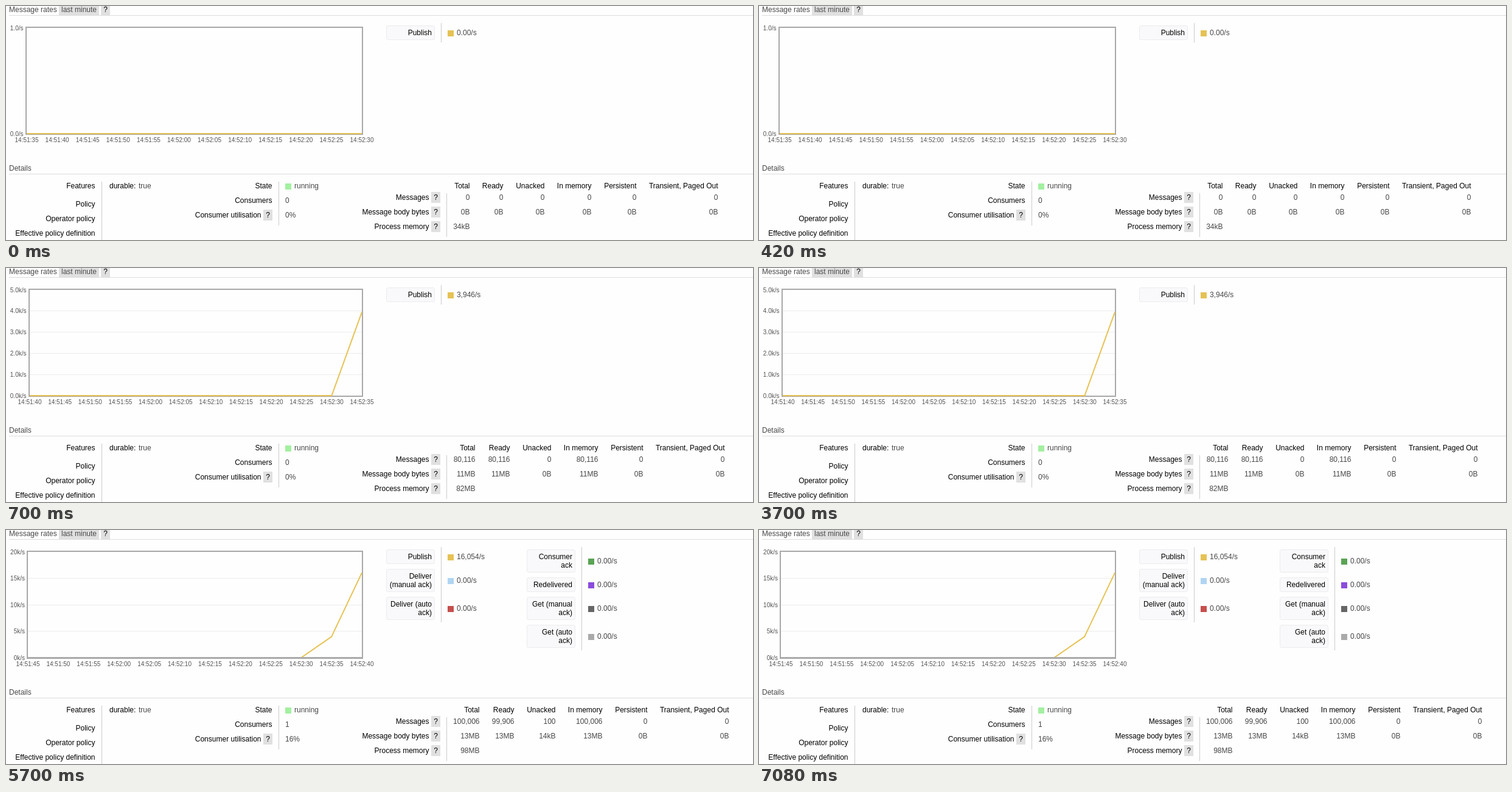
These frames come from a looping animation (1228 px wide and 385 px high, 8 s). An HTML page:

```html
<!DOCTYPE html>
<html lang="en">
<head>
<meta charset="utf-8">
<title>Queue monitor</title>
<style>
  html, body { margin: 0; width: 100%; height: 100%; overflow: hidden; background: #fefefe; }
  svg { display: block; width: 1228px; height: 385px; font: 12px "Liberation Sans", Arial, sans-serif; }
</style>
</head>
<body>
<svg id="stage" viewBox="0 0 1228 385"></svg>
<script>
const GREY = '#484848', BLACK = '#000', RULE = '#ddd', DIVIDER = '#ccc', GOLD = '#e6c255';
const RIGHT = 585, TOP = 36, BOTTOM = 210;

const text = (x, y, s, fill = GREY, anchor = 'start', size = 12) =>
  `<text x="${x}" y="${y}" fill="${fill}" text-anchor="${anchor}" font-size="${size}">${s}</text>`;
const label = (x, y, s) => text(x, y, s, BLACK, 'end');
const rect = (x, y, w, h, fill, more = '') =>
  `<rect x="${x}" y="${y}" width="${w}" height="${h}" fill="${fill}" ${more}/>`;
const divider = (x, y1, y2) => rect(x, y1, 1, y2 - y1, DIVIDER);
const help = (x, y) => rect(x, y, 15, 18, '#e0e0e0') + text(x + 7.5, y + 13, '?', BLACK, 'middle');
const line = (points, stroke) =>
  `<polyline points="${points.map(p => p.join()).join(' ')}" fill="none" stroke="${stroke}" stroke-width="2"/>`;

// rates: the last samples, five seconds apart; earlier samples are all zero
function chart({ left, max, ticks, labelX, start, rates, idle }) {
  const step = (RIGHT - left) / 11;
  const yOf = v => BOTTOM - v / max * (BOTTOM - TOP);
  let out = '';
  ticks.forEach((name, i) => {
    const y = BOTTOM - i / (ticks.length - 1) * (BOTTOM - TOP);
    if (y > TOP && y < BOTTOM) out += rect(left, Math.floor(y), RIGHT - left, 1, '#ececec');
    out += text(labelX, Math.floor(y) + 4, name, '#545454', 'end', 10);
  });
  for (let i = 0; i < 12; i++) {
    const s = start + i * 5;
    const time = `14:${51 + Math.floor(s / 60)}:${String(s % 60).padStart(2, '0')}`;
    out += text(left + i * step, 224, time, '#545454', 'middle', 10);
  }
  out += rect(left - 1, TOP - 1, RIGHT - left + 2, BOTTOM - TOP + 2, 'none', 'stroke="#a8a8a8" stroke-width="2"');
  const first = 12 - rates.length;
  const points = [[left, BOTTOM], ...rates.map((v, i) => [left + (first + i) * step, yOf(v)])];
  out += line(points, GOLD);
  if (idle) out += line([[left, BOTTOM], [RIGHT, BOTTOM]], '#aaa');
  return out;
}

// rows: [lines of the button, colour, value]
function legend(x, rows) {
  let y = 32, out = '';
  for (const [lines, colour, value] of rows) {
    const h = 10 + 14 * lines.length, mid = y + h / 2;
    out += rect(x + .5, y + .5, 79, h - 1, '#f9f9fb', 'rx="2.5" stroke="#ececee"');
    lines.forEach((s, i) => out += label(x + 75, y + 16 + 14 * i, s));
    out += rect(x + 101, mid - 4, 10, 10, colour) + text(x + 116, mid + 4, value);
    y += h + 8;
  }
  return out + divider(x + 90, 28, y - 4);
}

function table(total, ready, rows) {
  const columns = [total, ready, ...[68, 145, 219, 353].map(d => ready + d)];
  const heads = ['Total', 'Ready', 'Unacked', 'In memory', 'Persistent', 'Transient, Paged Out'];
  let out = heads.map((s, i) => label(columns[i], 300, s)).join('');
  rows.forEach((row, r) => row.split(' ').forEach((s, i) =>
    out += text(columns[i], 319 + 24 * r, s, GREY, 'end')));
  return out;
}

const fixed = [
  text(5, 10, 'Message rates'),
  rect(87, 0, 66, 15, '#e0e0e0'), text(91, 10, 'last minute'), help(156, -3),
  rect(5, 15, 1223, 1, RULE),
  text(5, 271, 'Details'), rect(5, 276, 1223, 1, RULE),
  label(146.5, 300, 'Features'), label(146.5, 330, 'Policy'),
  label(146.5, 354, 'Operator policy'), label(146.5, 378, 'Effective policy definition'),
  divider(157, 289, 385),
  text(170, 300, 'durable:', BLACK), text(218, 300, 'true'),
  label(437.5, 300, 'State'), label(437.5, 324, 'Consumers'),
  label(419.5, 348, 'Consumer utilisation'), help(423, 335),
  divider(448, 289, 361),
  rect(459, 292, 10, 10, '#a3f0a0'), text(474, 300, 'running'),
  ...['Messages', 'Message body bytes', 'Process memory'].map((s, i) =>
    label(695.5, 319 + 24 * i, s) + help(699, 306 + 24 * i)),
  divider(724, 308, 380)
].join('');

const view = (plot, legends, consumers, use, cells) =>
  fixed + chart(plot) + legends + text(459, 324, consumers) + text(459, 348, use) + table(...cells);

const views = [
  view({ left: 34, max: 1, ticks: ['0.0/s', '1.0/s'], labelX: 28.5, start: 35, rates: [0] },
    legend(625, [[['Publish'], GOLD, '0.00/s']]),
    '0', '0%',
    [762.5, 817.5, ['0 0 0 0 0 0', '0B 0B 0B 0B 0B 0B', '34kB']]),
  view({ left: 39, max: 5000, ticks: [0, 1, 2, 3, 4, 5].map(n => n + '.0k/s'), labelX: 33.5, start: 40, rates: [0, 3946] },
    legend(625, [[['Publish'], GOLD, '3,946/s']]),
    '0', '0%',
    [771.5, 828.5, ['80,116 80,116 0 80,116 0 0', '11MB 11MB 0B 11MB 0B 0B', '82MB']]),
  view({ left: 36, max: 20000, ticks: [0, 5, 10, 15, 20].map(n => n + 'k/s'), labelX: 31, start: 45, rates: [0, 3946, 16054], idle: true },
    legend(625, [
      [['Publish'], GOLD, '16,054/s'],
      [['Deliver', '(manual ack)'], '#b0d5f2', '0.00/s'],
      [['Deliver (auto', 'ack)'], '#c5504d', '0.00/s']
    ]) + legend(856, [
      [['Consumer', 'ack'], '#5aa355', '0.00/s'],
      [['Redelivered'], '#8b4cdc', '0.00/s'],
      [['Get (manual', 'ack)'], '#666', '0.00/s'],
      [['Get (auto', 'ack)'], '#aaa', '0.00/s']
    ]),
    '1', '16%',
    [778.5, 835.5, ['100,006 99,906 100 100,006 0 0', '13MB 13MB 14kB 13MB 0B 0B', '98MB']])
];

const stage = document.getElementById('stage');
let shown = -1;
function draw() {
  const t = performance.now() % 8000;
  const next = t < 700 ? 0 : t < 5700 ? 1 : 2;
  if (next !== shown) stage.innerHTML = views[shown = next];
  requestAnimationFrame(draw);
}
draw();
</script>
</body>
</html>
```
